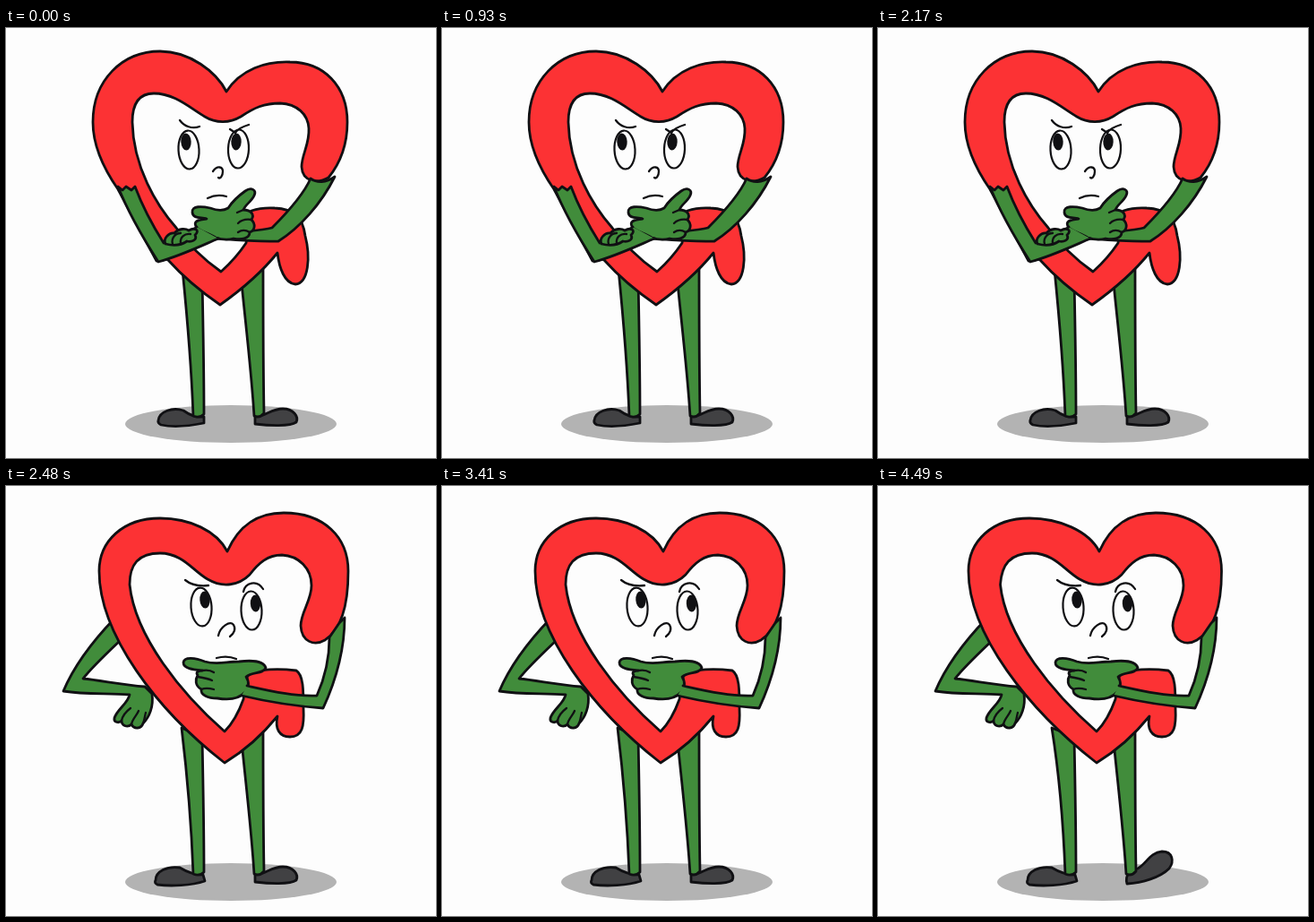
An HTML page that plays this animation: 480x480 px, repeating every 4.64 s.

```html
<!DOCTYPE html>
<html lang="en">
<head>
<meta charset="utf-8">
<title>Thinking heart</title>
<style>
  html, body { margin: 0; width: 100%; height: 100%; overflow: hidden; background: #fdfdfd; }
  svg { display: block; width: 100%; height: 100%; }
  path, .eye { stroke: #101013; stroke-width: 2.8; stroke-linecap: round; stroke-linejoin: round; }
  .red { fill: #fc3234; }
  .green { fill: #418c3b; }
  .shoe { fill: #414143; }
  .line { fill: none; stroke-width: 2.3; }
  .eye { fill: #fdfdfd; stroke-width: 2.2; }
  .pupil { fill: #101013; }
</style>
</head>
<body>
<svg viewBox="0 0 480 480">
  <ellipse cx="251" cy="442" rx="118" ry="21" fill="#b3b3b3"/>
  <g id="figure"></g>
</svg>
<script>
const LOOP = 4640, TAP = 310, LIFT = 150, TURN = 8 * TAP;

const shape = (kind, d) => `<path class="${kind}" d="${d}"/>`;
const oval = (kind, x, y, rx, ry, tilt = 0) =>
  `<ellipse class="${kind}" cx="${x}" cy="${y}" rx="${rx}" ry="${ry}" transform="rotate(${tilt} ${x} ${y})"/>`;
const eye = (x, y, px, py, tilt) => oval('eye', x, y, 11.5, 21.5, tilt) + oval('pupil', px, py, 5.7, 9.5, tilt);

const legs = top =>
  shape('green', `M${top} 270 C202 320 207 380 209 433 Q216 436 221 431 C221 380 220 330 219 280Z`) +
  shape('green', 'M263 285 C268 335 274 385 277 433 Q283 436 288 430 C287 375 287 320 287 262Z');

const shoes = {
  left: shape('shoe', 'M170 438 C171 428 186 423 198 427 C205 432 213 435 221 434 L221 441 C206 444 187 446 173 443 Q169 441 170 438Z'),
  leftWide: shape('shoe', 'M167 440 C167 430 180 424 194 426 C202 431 212 434 220 434 L222 441 C207 446 184 447 169 445 Q165 443 167 440Z'),
  leftUp: shape('shoe', 'M178 418 C181 409 196 413 205 420 C212 427 221 429 222 440 C215 445 198 441 188 434 C181 430 176 425 178 418Z'),
  right: shape('shoe', 'M278 434 C289 434 296 425 309 425 C321 425 327 434 324 440 C317 445 294 444 278 442Z'),
  rightUp: shape('shoe', 'M278 444 C275 434 282 429 290 427 C300 421 304 409 317 408 C329 408 331 419 325 427 C315 437 295 443 278 444Z')
};

// The lobes sway by a few pixels while the foot is lifted.
const crossedHeart = s => shape('red',
  `M246 71 C235 49 ${205 + s} ${26 + s / 3} ${172 + s} 26 C${130 + s} 26 ${97 + s} 58 ${97 + s} 105
   C${97 + s} 132 ${109 + s} 157 125 180 L168 260 L180 258 C198 278 220 296 239 309
   C263 292 286 272 303 251 C305 268 311 285 323 286 C338 285 340 255 334 232
   C331 210 321 202 300 201 Q286 200 274 204 L268 240 C260 252 250 263 240 272
   C220 258 203 241 190 223 C168 198 142 155 141 105 C141 83 150 73 165 73
   C188 73 205 89 222 99 C235 107 250 106 262 99 C277 89 288 84 306 84
   C325 85 337 96 338 112 C339 130 330 141 330 155 C331 172 348 174 360 167
   C${373 + s} 151 ${381 + s} 130 ${381 + s} 105 C${381 + s} 65 ${355 + s} 38 ${317 + s} 38 C290 37 262 46 246 71Z`);

const hipHeart = (l, r) => shape('red',
  `M247 73 C235 50 ${205 + l} 36 ${172 + l} 36 C${130 + l} 36 ${104 + l} 62 ${104 + l} 95
   C${104 + l} 165 168 250 244 309 C267 295 286 278 303 257 C300 271 305 280 317 280
   C331 280 333 268 332 248 C332 228 332 211 324 206 C308 204 287 204 270 209 L265 238
   C260 252 254 264 244 274 C196 232 ${144 + l / 2} 168 ${138 + l / 2} 110 C138 88 147 75 172 75
   C197 75 209 95 225 104 C242 114 260 111 272 99 C282 86 292 77 308 77
   C327 78 341 92 341 111 C341 128 329 141 329 156 C330 174 344 179 356 172
   C${375 + r} 160 ${382 + r} 130 ${382 + r} 95 C${382 + r} 57 ${355 + r} 30 310 30 C280 30 260 44 247 73Z`);

const crossedArms =
  shape('green', 'M235 235 C260 237 282 239 304 238 C328 223 352 196 367 166 C357 173 347 173 340 168 C333 184 317 203 297 223 C290 225 279 226 268 227') +
  shape('green', `M208 206 C207 198 219 199 228 201 C236 204 243 204 248 201 C253 193 260 187 267 182
   C274 177 280 181 277 187 C274 194 267 197 265 203 C273 203 278 208 274 214 C279 219 278 226 272 228
   C272 235 263 237 254 235 C247 237 240 236 234 234 C226 229 217 227 213 223 C208 216 214 214 224 213 C217 211 209 213 208 206Z`) +
  shape('line', 'M265 203 L258 206 M274 214 C267 213 262 215 259 218 M272 228 C267 225 262 226 259 228') +
  shape('green', 'M237 235 C216 244 193 255 170 261 C154 236 136 205 125 177 L130 181 L134 177 L140 181 L144 177 C153 201 164 221 176 240 C188 237 201 231 213 222') +
  shape('green', 'M178 241 C175 235 182 228 188 229 C193 223 201 224 204 226 C211 222 217 226 211 231 C214 237 207 239 202 238 C195 243 186 243 178 241Z') +
  shape('line', 'M186 241 C184 235 189 229 195 229 M195 240 C194 234 199 229 206 230');

const backArm =
  shape('green', 'M121 148 C96 174 75 203 64 229 C89 233 114 231 138 233 C136 243 124 249 121 259 C120 264 126 265 129 262 C129 268 136 270 140 266 C143 272 151 271 153 265 C160 258 165 246 163 232 L155 224 C130 222 106 217 86 215 C96 202 110 189 130 170Z') +
  shape('line', 'M129 262 C130 256 135 251 139 248 M140 266 C141 260 146 256 148 251 M153 265 C155 260 155 256 156 253');

const chinArm =
  shape('green', `M198 197 C199 190 212 192 222 196 C235 200 246 196 260 196 C276 194 288 196 290 203
   C287 210 275 207 268 213 C272 219 271 226 267 230 C260 238 248 239 236 237 C225 237 217 233 218 227
   C211 223 211 216 214 211 C211 208 215 206 219 206 C209 205 198 204 198 197Z`) +
  shape('line', 'M219 206 C224 205 229 206 232 208 M214 213 C220 214 226 215 230 217 M218 227 C223 225 228 226 232 227') +
  shape('green', 'M263 234 C297 242 326 246 354 248 C366 222 378 187 378 147 L372 153 L361 169 C361 193 356 214 347 234 C321 235 296 229 269 223');

const leftFace =
  eye(204, 136, 201, 127, -3) + eye(259.5, 135, 257, 127, 2) +
  shape('line', 'M194 103 C199 110 208 113 216 110 M250 113 L256 117 C259 112 264 110 271 108') +
  shape('line', 'M231 160 C236 153 242 155 242 160 C242 165 239 169 237 167 M225 190 C231 187 239 186 246 188');

const rightFace =
  eye(218, 135, 222, 127, -4) + eye(274, 139, 278.5, 131, -2) +
  shape('line', 'M200 105 C206 110 216 112 226 111 M265 118 C267 108 280 104 287 115') +
  shape('line', 'M237 167 C239 157 250 150 254 155 C257 160 254 165 250 168 M235 192 C242 190 250 190 257 193');

const crossed = up =>
  (up ? shoes.leftUp : shoes.left) + shoes.right + legs(197) +
  crossedHeart(up ? 2.7 : 0) + crossedArms + leftFace;

const onHip = up =>
  shoes.leftWide + (up ? shoes.rightUp : shoes.right) + legs(up ? 194 : 196) + backArm +
  hipHeart(up ? -3 : 0, up ? 1.5 : 0) + chinArm + rightFace;

const scenes = [crossed(false), crossed(true), onHip(false), onHip(true)];
const figure = document.getElementById('figure');
const start = performance.now();
let shown = -1;

function draw(now) {
  const t = Math.max(0, now - start) % LOOP;
  const scene = (t >= TURN ? 2 : 0) + (t % TAP >= LIFT ? 1 : 0);
  if (scene !== shown) figure.innerHTML = scenes[shown = scene];
  requestAnimationFrame(draw);
}
draw(start);
</script>
</body>
</html>
```
